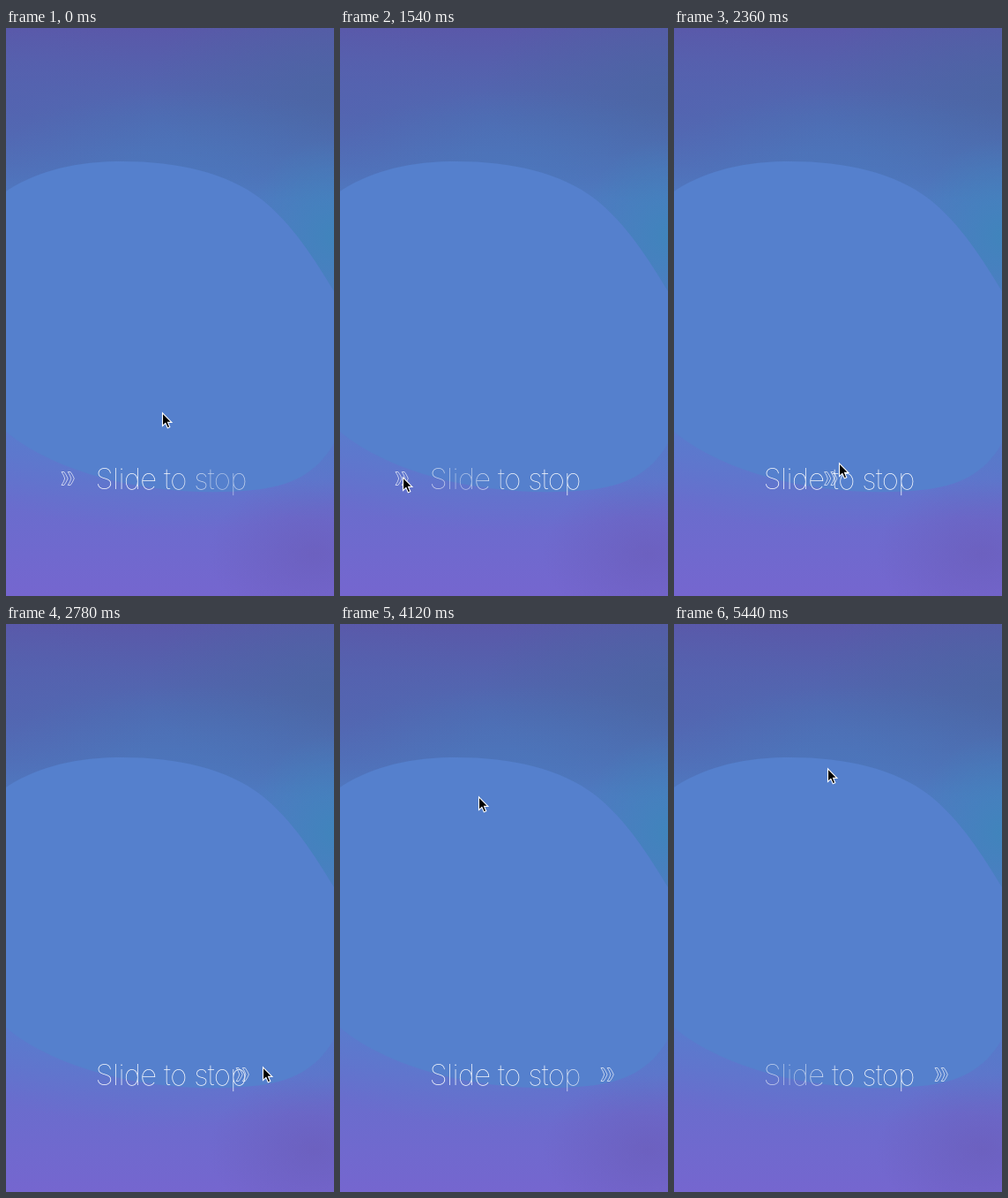
An HTML page with a canvas for the animation above (5500 ms loop, 372 by 643 pixels).

```html
<!DOCTYPE html>
<html lang="en">
<head>
<meta charset="utf-8">
<title>Slide to stop</title>
<style>
  html, body { margin: 0; width: 100%; height: 100%; overflow: hidden; background: #5580cd; }
  canvas { display: block; }
</style>
</head>
<body>
<canvas id="stage" width="372" height="643"></canvas>
<script>
const W = 372, H = 643, LOOP = 5500;
const canvas = document.getElementById('stage');
const ctx = canvas.getContext('2d');

const clamp = (v, lo, hi) => Math.min(hi, Math.max(lo, v));
const linear = u => u;
const smooth = u => u * u * (3 - 2 * u);

// The pointer rests between moves
const home = { x: 177, y: 435 };
const grip = { x: 71, y: 508 };
const moves = [
  { from: 60, to: 600, x: 95, y: 486, ease: smooth },
  { from: 620, to: 960, x: 74, y: 523, ease: smooth },
  { from: 1180, to: 1500, ...grip, ease: smooth },
  { from: 1740, to: 2200, x: 172, y: 492, ease: smooth },
  { from: 2200, to: 2360, x: 187, y: 492, ease: linear },
  { from: 2360, to: 2880, x: 316, y: 503, ease: linear },
  { from: 3140, to: 3600, x: 114, y: 656, ease: smooth },
  { from: 3700, to: 4120, x: 157, y: 195, ease: smooth },
  { from: 4260, to: 4760, x: 170, y: -22, ease: smooth },
  { from: 4880, to: 5360, x: 174, y: 163, ease: smooth }
];

function pointerAt(t) {
  let { x, y } = home;
  for (const m of moves) {
    if (t < m.from) break;
    const k = m.ease(clamp((t - m.from) / (m.to - m.from), 0, 1));
    x += (m.x - x) * k;
    y += (m.y - y) * k;
  }
  return { x, y };
}

// The handle trails the pointer while dragged and stops at the end of its track
function handleOffset(t) {
  const grabbed = 1740, released = 2960, lag = 90, track = 233;
  if (t < grabbed + lag) return 0;
  return clamp(pointerAt(Math.min(t, released) - lag).x - grip.x, 0, track);
}

function glow(c, x, y, rx, ry, rgb, alpha) {
  c.save();
  c.translate(x, y);
  c.scale(rx, ry);
  const g = c.createRadialGradient(0, 0, 0, 0, 0, 1);
  g.addColorStop(0, `rgba(${rgb},${alpha})`);
  g.addColorStop(1, `rgba(${rgb},0)`);
  c.fillStyle = g;
  c.fillRect(-1, -1, 2, 2);
  c.restore();
}

function makeBackground() {
  const bg = document.createElement('canvas');
  bg.width = W;
  bg.height = H;
  const c = bg.getContext('2d');
  const sky = c.createLinearGradient(0, 0, 0, H);
  sky.addColorStop(0, '#5a58a9');
  sky.addColorStop(0.16, '#4f6bb2');
  sky.addColorStop(0.3, '#4f7ac1');
  sky.addColorStop(0.68, '#5a7acd');
  sky.addColorStop(0.83, '#696dcd');
  sky.addColorStop(1, '#7566cf');
  c.fillStyle = sky;
  c.fillRect(0, 0, W, H);

  glow(c, W, 70, 210, 130, '74,101,160', 0.75);
  glow(c, 0, 90, 170, 110, '86,97,176', 0.6);
  glow(c, 210, 150, 220, 80, '74,118,186', 0.5);
  glow(c, W, 235, 100, 110, '64,132,188', 1);
  glow(c, 186, 430, 310, 140, '85,128,205', 1);
  glow(c, W, 490, 120, 70, '85,122,200', 0.6);
  glow(c, 350, 595, 120, 85, '106,92,184', 0.65);

  // Flat blue centre
  c.fillStyle = '#5580cd';
  c.beginPath();
  c.moveTo(0, 185);
  c.bezierCurveTo(30, 165, 70, 152, 125, 151);
  c.bezierCurveTo(190, 150, 250, 163, 290, 194);
  c.bezierCurveTo(325, 222, 350, 262, W, 298);
  c.lineTo(W, 470);
  c.bezierCurveTo(352, 505, 322, 519, 280, 523);
  c.bezierCurveTo(190, 532, 70, 514, 0, 457);
  c.fill();
  return bg;
}

// A dim band sweeps across the label at constant speed
function drawLabel(t) {
  const period = 1955, speed = 0.267, half = 66;
  const center = 39.5 + speed * ((t - 1180 + period) % period);
  const g = ctx.createLinearGradient(center - half, 0, center + half, 0);
  g.addColorStop(0, 'rgba(255,255,255,1)');
  g.addColorStop(0.5, 'rgba(255,255,255,0.5)');
  g.addColorStop(1, 'rgba(255,255,255,1)');
  ctx.fillStyle = g;
  ctx.font = '100 33px Inter, Roboto, sans-serif';
  ctx.letterSpacing = '-0.7px';
  ctx.fillText('Slide to stop', 101.5, 522);
}

function drawHandle(dx) {
  ctx.save();
  ctx.translate(62.5 + dx, 502.5);
  ctx.strokeStyle = 'rgba(255,255,255,0.72)';
  ctx.lineWidth = 0.9;
  ctx.lineJoin = 'round';
  for (let i = 0; i < 2; i++) {
    ctx.beginPath();
    ctx.moveTo(0.5, 0);
    ctx.lineTo(3.4, 0);
    ctx.quadraticCurveTo(6, 3.4, 7.6, 7.5);
    ctx.quadraticCurveTo(6, 11.6, 3.4, 15);
    ctx.lineTo(0.5, 15);
    ctx.quadraticCurveTo(3, 11.6, 4.2, 7.5);
    ctx.quadraticCurveTo(3, 3.4, 0.5, 0);
    ctx.stroke();
    ctx.translate(7.2, 0);
  }
  ctx.restore();
}

function drawPointer({ x, y }) {
  ctx.save();
  ctx.translate(Math.round(x) + 0.5, Math.round(y) + 0.8);
  ctx.fillStyle = '#000';
  ctx.strokeStyle = '#fff';
  ctx.lineWidth = 1.1;
  const arrow = new Path2D('M0 0V14.6L3.4 11.5L5.8 17L8.3 16L6 10.6H10.4Z');
  ctx.fill(arrow);
  ctx.stroke(arrow);
  ctx.restore();
}

const background = makeBackground();
const start = performance.now();

function frame() {
  const t = Math.max(0, performance.now() - start) % LOOP;
  ctx.drawImage(background, 0, 0);
  drawLabel(t);
  drawHandle(handleOffset(t));
  drawPointer(pointerAt(t));
  requestAnimationFrame(frame);
}
frame();
</script>
</body>
</html>
```
